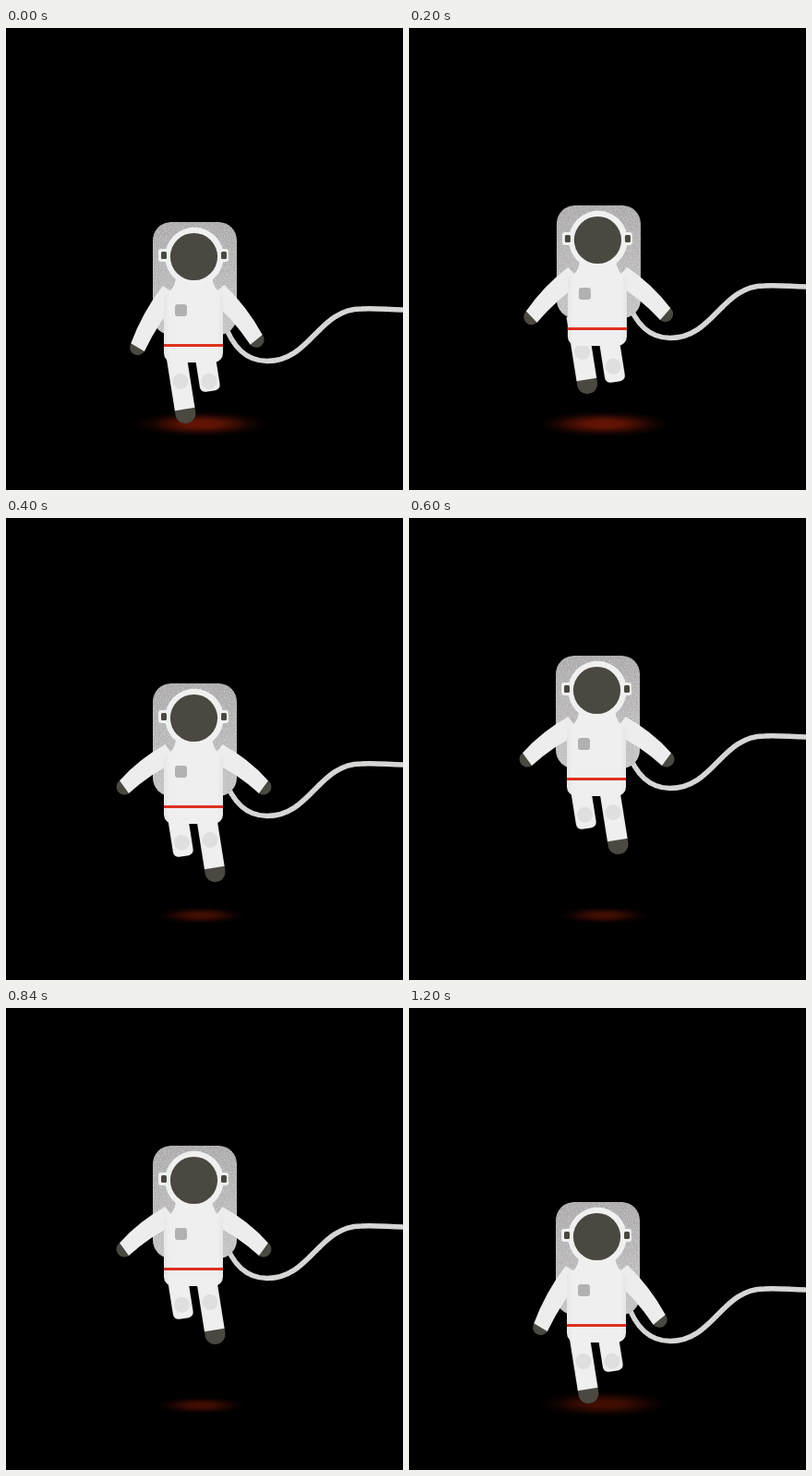
Recreate the animation shown at these times as an HTML page. Size 430 px wide and 500 px high, loop 1400 ms.

```html
<!DOCTYPE html>
<html lang="en">
<head>
<meta charset="utf-8">
<title>Floating astronaut</title>
<style>
  html, body { margin: 0; width: 100%; height: 100%; overflow: hidden; background: #000; }
  svg { display: block; width: 430px; height: 500px; }
</style>
</head>
<body>
<svg viewBox="0 0 430 500">
  <defs>
    <radialGradient id="glowFill">
      <stop offset="0" stop-color="#671505"/>
      <stop offset=".3" stop-color="#5a1204"/>
      <stop offset=".55" stop-color="#340a03"/>
      <stop offset=".75" stop-color="#130401"/>
      <stop offset="1" stop-color="#000"/>
    </radialGradient>
    <linearGradient id="packFill" x2="0" y2="1">
      <stop offset="0" stop-color="#aaa7a8"/>
      <stop offset="1" stop-color="#c3c1c2"/>
    </linearGradient>
    <linearGradient id="suit">
      <stop offset="0" stop-color="#e6e6e6"/>
      <stop offset=".1" stop-color="#efefef"/>
      <stop offset=".9" stop-color="#efefef"/>
      <stop offset="1" stop-color="#e6e6e6"/>
    </linearGradient>
    <filter id="grain" x="0" y="0" width="430" height="500" filterUnits="userSpaceOnUse"
            color-interpolation-filters="sRGB">
      <feTurbulence type="fractalNoise" baseFrequency=".8" numOctaves="2" seed="4"/>
      <feColorMatrix values="0 0 0 0 1  0 0 0 0 1  0 0 0 0 1  1 0 0 0 -.42"/>
      <feComposite in2="SourceGraphic" operator="in" result="specks"/>
      <feMerge><feMergeNode in="SourceGraphic"/><feMergeNode in="specks"/></feMerge>
    </filter>
  </defs>

  <ellipse id="glow" rx="72" ry="14" fill="url(#glowFill)"/>
  <path id="rope" d="M236 318C244 342 258 360.5 283 360.5C330 360.5 338 304 385 304C400 303 415 305 434 305"
        fill="none" stroke="#d2d2d0" stroke-width="5.5" filter="url(#grain)"/>
  <g id="body">
    <rect x="159" y="210" width="91" height="122" rx="20" fill="url(#packFill)" filter="url(#grain)"/>
    <g id="limbs"></g>
    <path d="M171 289Q184 283 184 268H223Q224 283 235 289V352a10 10 0 0 1-10 10H181a10 10 0 0 1-10-10Z"
          fill="url(#suit)"/>
    <rect x="171" y="342" width="64" height="3" fill="#de3020"/>
    <rect x="183" y="299" width="13" height="13" rx="3" fill="#b1b1b1"/>
    <rect x="165" y="239" width="76" height="14" rx="3" fill="#f0f0f0"/>
    <circle cx="204" cy="247.5" r="31.7" fill="#f0f0f0"/>
    <circle cx="203.5" cy="247.5" r="25.6" fill="#4a4840"/>
    <g fill="#4a4840">
      <rect x="168" y="242" width="6" height="8" rx="1.5"/>
      <rect x="233" y="242" width="6" height="8" rx="1.5"/>
    </g>
  </g>
</svg>
<script>
const $ = id => document.getElementById(id);
const DARK = '#4a4840';

// side is -1 for left and 1 for right; angle is measured outwards from straight down.
function arm(side, angle) {
  const length = 81 - angle / 3, mid = length / 2;
  return `<g transform="translate(203.5 285) scale(${side} 1) translate(24.5 0) rotate(${-angle})">
    <circle cy="${length}" r="8.5" fill="${DARK}"/>
    <path d="M-11 0Q-5 ${mid} -8.5 ${length}H8.5Q15 ${mid} 11 0Z" fill="#ededed"/></g>`;
}

// A straight leg ends in a boot, a bent one at the shin.
function leg(side, length, straight) {
  const hip = 202 + side * (straight ? 16.3 : 14.8);
  const knee = straight ? 35 : Math.min(17, length - 20);
  const shape = straight
    ? `<path d="M-11-5V0a11 11 0 0 0 22 0V-5Z" fill="${DARK}"/>
       <rect x="-11" y="-75" width="22" height="70.5" fill="url(#suit)"/>`
    : '<rect x="-11" y="-70" width="22" height="70" rx="6" fill="url(#suit)"/>';
  return `<g transform="translate(${hip + length * .158} ${362 + length}) rotate(-9)">${shape}
    <circle cy="${-knee}" r="8.5" fill="#dfdfdf"/></g>`;
}

const low = { lift: 0, straight: -1, reach: 55, bend: 31 };
const rise = { lift: 18, straight: -1, reach: 41, bend: 39 };
const climb = { lift: 31, straight: 1, reach: 52, bend: 35 };
const peak = { ...climb, lift: 61 };
const fall = { ...climb, lift: 16, bend: 45 };

// One pose per 200 ms; the peak is held twice as long.
const beats = [low, rise, climb, peak, peak, fall, low];

function draw(step) {
  const { lift, straight, reach, bend } = beats[step];
  const tuck = Math.max(0, 1 - lift / 31) ** 1.2; // arms come in near the ground
  const sway = 4 * tuck * (1 - tuck);
  const glowSize = tuck ? 1 : .68;

  $('glow').setAttribute('transform', `translate(211 ${tuck ? 428.5 : 430}) scale(${glowSize})`);
  $('glow').setAttribute('opacity', step < 2 ? 1 : .66);
  $('rope').setAttribute('transform', `translate(0 ${lift && -lift - 7})`);
  $('body').setAttribute('transform', `translate(${sway} ${-lift})`);
  $('limbs').innerHTML = arm(-1, 54 - 23 * tuck) + arm(1, 54 - 14.5 * tuck)
    + leg(straight, reach, true) + leg(-straight, bend, false);
}

let shown;
function tick() {
  const step = Math.floor(performance.now() / 200) % beats.length;
  if (step !== shown) draw(shown = step);
  requestAnimationFrame(tick);
}
tick();
</script>
</body>
</html>
```
